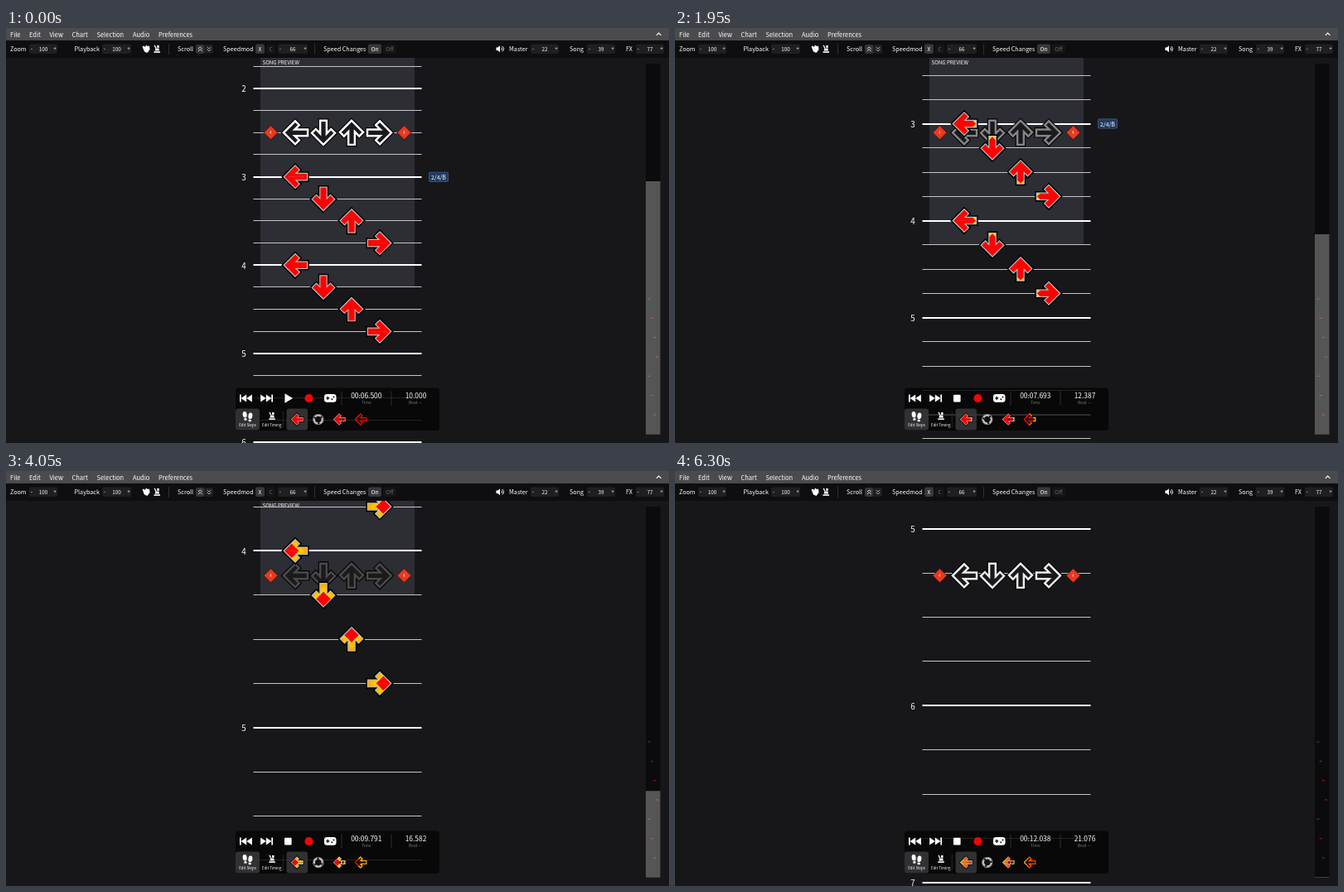
Recreate the animation shown at these times as an HTML page with a canvas. Size 800 by 501 pixels, loop 6.35 s.

```html
<!DOCTYPE html>
<html lang="en">
<head>
<meta charset="utf-8">
<title>Step chart editor</title>
<style>
html, body { margin: 0; width: 100%; height: 100%; overflow: hidden; background: #18181b; }
canvas { display: block; width: 800px; height: 501px; }
</style>
</head>
<body>
<canvas id="stage" width="800" height="501"></canvas>
<script>
const c = document.getElementById('stage').getContext('2d');
const FONT = '"Noto Sans CJK JP", "Noto Sans CJK SC", "Noto Sans CJK", "Noto Sans", sans-serif';
const LOOP = 6350, STEP = 50, PLAY_AT = 450;
const TARGET_Y = 126.3, BEAT_PX = 26.67, TOP = 36;
const VIEW_LAG = .02;   // beats the playfield trails the clock while playing
const COLUMNS = [349.5, 383, 417, 450.5];
const TURNS = [0, -Math.PI / 2, Math.PI / 2, Math.PI];   // left, down, up, right
const NOTES = [12, 13, 14, 15, 16, 17, 18, 19];
const clamp = (v, lo, hi) => Math.min(hi, Math.max(lo, v));

function text(s, x, y, size, color = '#fff', align = 'left') {
  c.font = `${size}px ${FONT}`;
  c.textAlign = align;
  c.textBaseline = 'middle';
  c.fillStyle = color;
  c.fillText(s, x, y);
}
function rect(x, y, w, h, color, r = 0) {
  c.fillStyle = color;
  c.beginPath();
  c.roundRect(x, y, w, h, r);
  c.fill();
}
function disc(x, y, r, color) {
  c.fillStyle = color;
  c.beginPath();
  c.arc(x, y, r, 0, 7);
  c.fill();
}
function poly(points, color) {
  c.fillStyle = color;
  c.beginPath();
  points.forEach(([x, y]) => c.lineTo(x, y));
  c.closePath();
  c.fill();
}
function line(points, color, width) {
  c.strokeStyle = color;
  c.lineWidth = width;
  c.beginPath();
  points.forEach(([x, y]) => c.lineTo(x, y));
  c.stroke();
}
function at(x, y, turn, scale, draw) {
  c.save();
  c.translate(x, y);
  c.rotate(turn);
  c.scale(scale, scale);
  draw();
  c.restore();
}

// Arrows point left; the lower half is mirrored for the full outline.
const HALF = [[-13.5, 0], [-.5, 13], [4, 8.5], [-1, 3.6], [13.5, 3.6], [13.5, 0]];
const arrow = new Path2D(), halfArrow = new Path2D();
[...HALF, ...HALF.slice(1, -1).reverse().map(([x, y]) => [x, -y])].forEach(([x, y]) => arrow.lineTo(x, y));
arrow.closePath();
HALF.forEach(([x, y]) => halfArrow.lineTo(x, y || -.2));
halfArrow.closePath();

// A yellow front runs from tail to tip every two beats, then fades to red.
function noteGradient(beat) {
  const phase = beat / 2 % 1;
  const g = c.createLinearGradient(-14, 0, 0, 14);
  for (let i = 0; i <= 32; i++) {
    const s = i / 32;
    const age = phase - .177 - .287 * (1 - s);
    const green = age < 0 ? 0 : 215 * clamp(1 - age / .5, 0, 1);
    g.addColorStop(s, `rgb(255,${Math.round(green)},0)`);
  }
  return g;
}
function outline(color, width) {
  c.strokeStyle = color;
  c.lineWidth = width;
  c.stroke(arrow);
}
function halves(paint) {
  for (const side of [1, -1]) {
    c.save();
    c.scale(1, side);
    paint();
    c.restore();
  }
}
function note(beat) {
  outline('#000', 5.4);
  outline('#bcbcbc', 2.4);
  c.fillStyle = noteGradient(beat);
  halves(() => c.fill(halfArrow));
}
function hollowNote(beat) {
  c.fillStyle = '#111';
  c.fill(arrow);
  c.strokeStyle = noteGradient(beat);
  c.lineWidth = 2.6;
  halves(() => {
    c.beginPath();
    HALF.forEach(([x, y]) => c.lineTo(x, y));
    c.stroke();
  });
}
function receptor(beat) {
  const v = Math.round(255 * clamp(1 - 1.3 * (beat % 1), .29, 1));
  outline('#000', 4.4);
  c.fillStyle = '#1a1a1d';
  c.fill(arrow);
  outline(`rgb(${v},${v},${v})`, 2.3);
}

function playfield(beat, px) {
  const yOf = b => TARGET_Y + (b - beat) * px;
  c.save();
  c.beginPath();
  c.rect(0, TOP, 800, 465);
  c.clip();

  const end = yOf(17);
  if (end > TOP) {
    rect(307, TOP, 186, end - TOP, '#2d2d34');
    text('SONG PREVIEW', 309.5, 41.5, 6.2);
  }
  for (let b = Math.ceil(beat - 4.5); yOf(b) < 510; b++) {
    const y = yOf(b), bar = b % 4 === 0;
    if (bar) {
      rect(298.5, Math.round(y) - 1, 203, 2, '#fff');
      text(b / 4, 287, y + .7, 9.8, '#fff', 'center');
    } else {
      rect(298.5, Math.floor(y), 203, 1, '#c4c4c5');
    }
  }
  const badge = yOf(12);
  rect(510, badge - 6, 24, 12, '#48648c', 2.5);
  rect(510.6, badge - 5.4, 22.8, 10.8, '#213a60', 2);
  text('2/4/B', 522, badge + .3, 7, '#fff', 'center');

  for (const x of [319.5, 480.5]) {
    for (const [r, color] of [[9, '#4a1a14'], [8, '#e93a20']])
      poly([[x - r, TARGET_Y], [x, TARGET_Y - r], [x + r, TARGET_Y], [x, TARGET_Y + r]], color);
    text('4', x, TARGET_Y + .2, 4.2, '#fff', 'center');
  }
  COLUMNS.forEach((x, i) => at(x, TARGET_Y, TURNS[i], 1.08, () => receptor(beat)));
  NOTES.forEach((b, i) => at(COLUMNS[i % 4], yOf(b), TURNS[i % 4], 1, () => note(beat)));
  c.restore();
}

function overview(beat, px) {
  const yOf = b => 327 + (b - 12) * 23.33;
  rect(772, 43, 17.5, 448, '#0b0b0d');
  NOTES.slice(0, -1).forEach((b, i) => rect(774.5 + i % 4 * 3.2, yOf(b) - .5, 3, 1, '#a81c1c'));
  const top = Math.min(yOf(beat - 109 / px), 490);
  rect(772, top, 17.5, 490.7 - top, 'rgba(255,255,255,.3)');
}

function stepper(x, w, value) {
  rect(x, 19.5, w, 11.5, '#1f1f21', 2);
  text('-', x + 3, 25, 6.5, '#fff', 'center');
  text(value, x + w / 2, 25.4, 6.3, '#fff', 'center');
  text('+', x + w - 3, 25, 6.5, '#fff', 'center');
}
function metronome(x, y) {
  rect(x - 3.5, y + 2.8, 7.5, 1.6, '#fff');
  poly([[x - 1.6, y - 1], [x + 2.4, y - 1], [x + 3, y + 2], [x - 2.4, y + 2]], '#fff');
  line([[x - 1, y - 1], [x - 2.8, y - 4.6]], '#fff', 1.3);
  rect(x + .3, y - 4.6, 2.4, 3, '#fff');
}
function chevrons(x, y, dir, color) {
  for (const d of [-1.2, 1.6])
    line([[x - 2.4, y + d + dir], [x, y + d - dir], [x + 2.4, y + d + dir]], color, 1);
}

function header() {
  rect(0, 0, 800, 15, '#4b4b4d');
  [['File', 5], ['Edit', 28], ['View', 52.5], ['Chart', 79.5], ['Selection', 109.5], ['Audio', 153], ['Preferences', 184]]
    .forEach(([s, x]) => text(s, x, 7.8, 7.5));
  line([[784.8, 8.8], [787.6, 6], [790.4, 8.8]], '#fff', 1.1);

  rect(0, 15, 800, 21, '#0e0e10');
  [['Zoom', 5], ['Playback', 82.5], ['Scroll', 207], ['Speedmod', 262], ['Speed Changes', 383], ['Master', 607], ['Song', 680], ['FX', 748]]
    .forEach(([s, x]) => text(s, x, 25.4, 7.2));
  [[28, 34, 100], [116, 35, 100], [328, 36, 66], [633, 34, 22], [701, 34, 39], [760, 34, 77]]
    .forEach(([x, w, v]) => stepper(x, w, v));
  for (const x of [196, 372]) rect(x, 19, .8, 13, '#38383a');

  // clapping hands
  poly([[164.5, 22.5], [166, 21.5], [168, 23], [169, 20.5], [171, 22], [173, 21.5], [173.5, 26], [170.5, 30], [167, 28.5]], '#fff');
  metronome(182, 25.5);

  rect(229, 20, 10.5, 11, '#353537', 2);
  rect(240, 20, 10, 11, '#1f1f21', 2);
  chevrons(234.3, 25.2, 1, '#ddd');
  chevrons(245, 25.2, -1, '#aaa');
  rect(301, 19.5, 11, 11.5, '#38383a', 2);
  rect(314, 19.5, 11, 11.5, '#151517', 2);
  text('X', 306.5, 25.4, 6.6, '#fff', 'center');
  text('C', 319.5, 25.4, 6.6, '#666', 'center');
  rect(437, 19.5, 16, 11.5, '#38383a', 2);
  rect(455, 19.5, 16, 11.5, '#151517', 2);
  text('On', 445, 25.4, 6.8, '#fff', 'center');
  text('Off', 463, 25.4, 6.8, '#666', 'center');

  // speaker
  poly([[591.5, 23.6], [593.5, 23.6], [596, 21.3], [596, 29.2], [593.5, 27], [591.5, 27]], '#fff');
  c.strokeStyle = '#fff';
  c.lineWidth = 1;
  for (const r of [2, 4]) {
    c.beginPath();
    c.arc(596.5, 25.3, r, -.95, .95);
    c.stroke();
  }
}

function skip(x, y, dir) {
  at(x, y, 0, 1, () => {
    c.scale(dir, 1);
    rect(-7.5, -4.5, 1.7, 9, '#fff');
    for (const d of [-6, .7]) poly([[d, 0], [d + 6.7, -4.5], [d + 6.7, 4.5]], '#fff');
  });
}
function footprint(x, y, turn) {
  at(x, y, turn, 1, () => {
    c.fillStyle = '#fff';
    c.beginPath();
    c.ellipse(0, -1.3, 2.5, 3.8, 0, 0, 7);
    c.fill();
    rect(-1.7, 3.1, 3.5, 2.7, '#fff', 1.3);
  });
}
function mine() {
  disc(0, 0, 6.6, '#b5b5b5');
  disc(0, 0, 6, '#252527');
  c.strokeStyle = '#c8c8c8';
  c.lineWidth = 2;
  for (let i = 0; i < 3; i++) {
    c.beginPath();
    c.arc(0, 0, 4.8, i * 2.094, i * 2.094 + 1.6);
    c.stroke();
  }
  disc(0, 0, 3.4, '#111');
}

function panel(beat, time, playing) {
  rect(277, 434.5, 246, 51.5, 'rgba(5,5,6,.84)', 4);
  skip(289.5, 447, 1);
  skip(314.5, 447, -1);
  if (playing) rect(336, 442.8, 8.6, 8.6, '#fff', 1);
  else poly([[336.5, 441.3], [346, 447], [336.5, 452.7]], '#fff');
  disc(365.5, 447, 5.1, '#f50505');

  rect(384, 442, 14.5, 9.8, '#fff', 3.2);
  rect(386.2, 446.2, 4.2, 1.3, '#111');
  rect(387.6, 444.8, 1.3, 4.2, '#111');
  disc(393.3, 448.2, 1, '#111');
  disc(395.5, 445.6, 1, '#111');

  for (const x of [405, 465]) rect(x - .4, 438.5, .8, 17, '#3b3b3d');
  const whole = Math.floor(time);
  const pad = n => String(n).padStart(2, '0');
  const ms = String(Math.round((time - whole) * 1000) % 1000).padStart(3, '0');
  text(`${pad(Math.floor(whole / 60))}:${pad(whole % 60)}.${ms}`, 434.8, 444.3, 8.4, '#fff', 'center');
  text('Time', 434.8, 452.3, 5, '#777', 'center');
  text(beat.toFixed(3), 494.5, 443.6, 8.4, '#fff', 'center');
  text('Beat —', 494, 451.8, 5, '#777', 'center');

  rect(277, 459.5, 29, 26, 'rgba(56,56,59,.85)', 3);
  footprint(288.3, 468, -.12);
  footprint(294.7, 469.5, .12);
  text('Edit Steps', 291.5, 479.3, 4.4, '#fff', 'center');
  metronome(320.8, 468.5);
  text('Edit Timing', 320.8, 479.3, 4.4, '#fff', 'center');
  rect(333.8, 463, .8, 19, '#303032');

  rect(338.5, 459.5, 25.5, 26, 'rgba(56,56,59,.85)', 3);
  at(351.3, 472.5, 0, .5, () => note(beat));
  at(376.8, 472.5, beat * .8, 1, mine);
  at(402.3, 472.5, 0, .5, () => {
    note(beat);
    rect(0, -3, 3, 6, '#151515');
    rect(7, -3, 3, 6, '#151515');
  });
  at(428, 472.5, 0, .5, () => hollowNote(beat));
}

function frame(now) {
  const t = Math.floor(now % LOOP / STEP) * STEP;
  const playing = t >= PLAY_AT;
  const time = playing ? 5.7457 + t * .00099878 : 6.5;
  const beat = time * 2 - 3;
  const view = beat - (playing ? VIEW_LAG : 0);
  // scroll speed doubles between beats 12 and 16
  const px = BEAT_PX * (1 + clamp((beat - 12) / 4, 0, 1));
  rect(0, 0, 800, 501, '#17171a');
  playfield(view, px);
  header();
  overview(beat, px);
  panel(beat, time, playing);
  requestAnimationFrame(frame);
}
frame(0);
</script>
</body>
</html>
```
